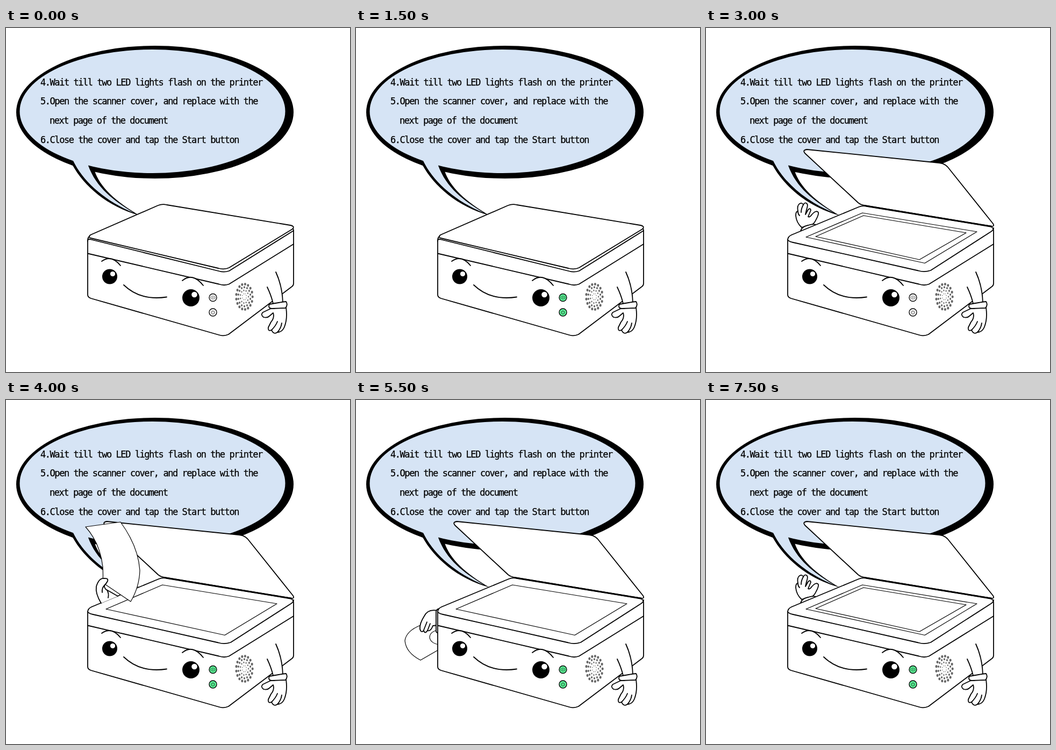
These frames come from a looping animation (640 by 640 pixels, 8 s). An HTML page:

```html
<!DOCTYPE html>
<html lang="en">
<head>
<meta charset="utf-8">
<title>Scanning the next page</title>
<style>
  html, body { margin: 0; width: 100%; height: 100%; overflow: hidden; background: #fff; }
  svg { display: block; width: 100vw; height: 100vh; }
  .ink { fill: #fff; stroke: #000; stroke-width: 1.8; stroke-linejoin: round; stroke-linecap: round; }
  .line { fill: none; }
  .thin { stroke-width: 1.2; }
  .solid { fill: #000; stroke: none; }
  .shine { stroke: none; }
  text {
    font: 17px "DejaVu Sans Mono", "Noto Sans Mono", monospace;
    letter-spacing: -1.45px; stroke: #000; stroke-width: .25px;
  }
</style>
</head>
<body>
<svg viewBox="0 0 640 640">
  <!-- speech bubble -->
  <ellipse cx="277" cy="156.5" rx="258" ry="123.5"/>
  <path d="M119 246C140 290 185 331 248 348.500C205 324 174 295 165 266Z"/>
  <g fill="#d6e4f5">
    <ellipse cx="272.500" cy="155" rx="247" ry="115"/>
    <path d="M125 240V247C143 285 184 322 238 344C200 321 168 297 153 256V240Z"/>
  </g>
  <text x="64" y="106.500">4.Wait till two LED lights flash on the printer</text>
  <text x="64" y="141.500">5.Open the scanner cover, and replace with the</text>
  <text x="81" y="177.500">next page of the document</text>
  <text x="64" y="213.500">6.Close the cover and tap the Start button</text>

  <g class="ink">
    <path id="half" d="M165 265L416 297Q427 298 436 304L532 367Q535 370 531 369.500L295 329.500Q290 329 284 325L166 267Q161 265 165 265Z"/>
    <path id="full" d="M188 226L434 251Q444 252 450 259L534 364Q537 369 532 369L295 330Q288 329 283 325L184 233Q179 227 188 226Z"/>

    <!-- arm pieces behind the body -->
    <g id="up">
      <path d="M178 371Q168 362 167 349Q167 341 171 341Q169 330 174 327Q179 324 181 329Q184 323 188 327Q190 330 187 338L185 347L190 338Q194 334 195 339L190 351Q193 353 197 347Q205 338 209 343Q210 347 205 356Q202 363 196 367Z"/>
      <path class="line" d="M171 341Q171 346 174 349M181 329Q177 336 177 343"/>
      <path d="M176 380Q176 370 190 367Q203 363 206 368L203 380Z"/>
    </g>
    <g id="side">
      <path class="thin" d="M160 461L120 484Q93 470 91 448Q93 430 120 419L160 410Z"/>
      <path class="thin" d="M156 427Q137 430 137 442Q139 454 160 456"/>
      <path d="M152 392Q134 388 127 402Q118 416 119 426Q121 434 126 429Q128 436 133 429Q139 431 143 420L152 419Z"/>
      <path class="line" d="M126 428L132 413M133 429L138 416"/>
      <path d="M160 387Q149 388 149 394V431Q151 435 160 434Z"/>
    </g>
    <path id="sleeve" d="M181 378Q189 354 218 346L228 362Z"/>

    <!-- body -->
    <path d="M152 395V496Q152 501 158 503L396 571Q405 574 414 570L532 481Q535 479 535 475V377Q535 371 529 369.500L300 332Q291 330 284 333L159 385Q152 388 152 395Z"/>
    <path class="line" d="M152 419.500L396 476.500Q406 480 415 476.500L535 402"/>

    <g id="closed">
      <path class="line" d="M152 397Q152 391 158 393.500L397 452.500Q406 455 415 452L535 377"/>
      <path d="M157 385L283 330Q291 327 299 329L529 367Q538 369 533 374L415 446Q406 450 395 447L158 391Q152 389 157 385Z"/>
    </g>
    <g id="open">
      <path class="line" d="M152 394Q154 397 160 398.500L395 451.500Q406 455 418 451L530 379Q535 376 535 372"/>
      <path class="line thin" d="M186 389L291 344L504 379L407 437.500Z"/>
      <path id="flat" class="line thin" d="M204 388L293 349L484 381L397 431Z"/>
      <path class="line" stroke-width="2.6" d="M295 330.500L531 369"/>
    </g>

    <!-- face -->
    <path d="M178 434Q196 421 213 442"/>
    <path d="M328 470Q347 454 367 479"/>
    <path class="line" d="M219 478Q250 508 299 500.500"/>
    <circle class="solid" cx="193" cy="462.500" r="14"/>
    <circle class="shine" cx="198.500" cy="457.500" r="4.600"/>
    <circle class="solid" cx="344" cy="502" r="16"/>
    <circle class="shine" cx="350.500" cy="496" r="5.300"/>

    <g id="leds" stroke-width="1.4">
      <circle cx="385" cy="501.500" r="7"/>
      <circle cx="385" cy="529" r="7"/>
      <path class="line" stroke-width=".8" d="M385 498V505M382 499L381 501.500L382 504M388 499L389 501.500L388 504M385 525.500V528.500M382.500 527Q380.500 530 383.500 532H386.500Q389.500 530 387.500 527"/>
    </g>
    <g id="speaker" fill="#666" stroke="none"></g>

    <!-- right arm -->
    <path d="M486 482Q494 499 497 513L515 511Q514 480 502 454"/>
    <path d="M495 521Q486 525 478 529Q473 533 479 538Q486 540 490 536L497 530Q500 539 493 547L488 557Q487 565 494 562Q498 571 505 566Q514 566 518 556Q524 541 521 520Z"/>
    <path class="line" d="M494 562Q502 554 505 546M505 566Q512 558 513 549M498 522Q504 520 512 521"/>
    <path d="M490 514Q487 521 494 522L520 521Q525 515 521 509Q505 511 490 514Z"/>

    <!-- page in the hand -->
    <g id="hold">
      <path class="thin" d="M148 236L213 227Q246 272 249 317Q248 348 232 375L180 340Q181 328 180 310Q175 266 148 236Z"/>
      <path d="M177 378Q166 360 168 347Q173 331 182 332Q191 331 189 337Q187 341 183 345Q183 351 187 353L196 358L208 365" />
      <path class="line" d="M183 345Q178 350 179 358M188 354Q192 360 190 368"/>
    </g>
    <g id="lay">
      <path class="thin" d="M297 331Q380 325 457 371L380 421Q306 372 206 383.500L250 361Z"/>
      <path d="M222 338Q233 327 246 327Q262 324 267 331Q272 335 267 338Q272 344 268 346Q263 347 258 344Q250 345 246 349Q257 357 256 364Q250 371 243 362L231 359Z"/>
      <path class="line" d="M267 338Q255 332 245 337M258 344Q251 341 246 344M246 349Q240 346 236 348"/>
      <path d="M214 342Q215 335 222 336Q224 348 233 358Q230 363 225 361Q216 353 214 342Z"/>
    </g>
  </g>
</svg>
<script>
  const $ = id => document.getElementById(id);
  const show = (id, on) => { $(id).style.display = on ? "" : "none"; };

  // speaker holes on four rings, growing outwards
  let holes = "";
  for (let ring = 1; ring <= 4; ring++) {
    const count = ring * 3 + 5;
    for (let i = 0; i < count; i++) {
      const a = (i + ring / 2) / count * 2 * Math.PI;
      const x = 443.5 + 3.8 * ring * Math.cos(a), y = 500 + 5.9 * ring * Math.sin(a);
      holes += `<ellipse cx="${x}" cy="${y}" rx="${0.2 + ring * 0.46}" ry="${0.3 + ring * 0.58}"/>`;
    }
  }
  $("speaker").innerHTML = holes;

  // one entry per half second
  const lit = "0101100110011001";
  const poses = ["", "", "", "", "", "up", "up", "lay", "hold", "side", "side", "side", "hold", "lay", "", "up"];

  function draw(now) {
    const step = Math.floor(now / 500) % 16, pose = poses[step];
    show("closed", step < 5);
    show("open", step >= 5);
    show("half", step === 5);
    show("full", step > 5);
    show("flat", step < 7 || step > 13);
    for (const id of ["up", "side", "hold", "lay"]) show(id, pose === id);
    show("sleeve", pose === "lay");
    $("side").setAttribute("transform", step === 9 ? "translate(1 4)" : "");
    $("leds").setAttribute("fill", lit[step] === "1" ? "#5cf598" : "#fff");
  }

  const start = performance.now();
  function tick() {
    draw(performance.now() - start);
    requestAnimationFrame(tick);
  }
  tick();
</script>
</body>
</html>
```
